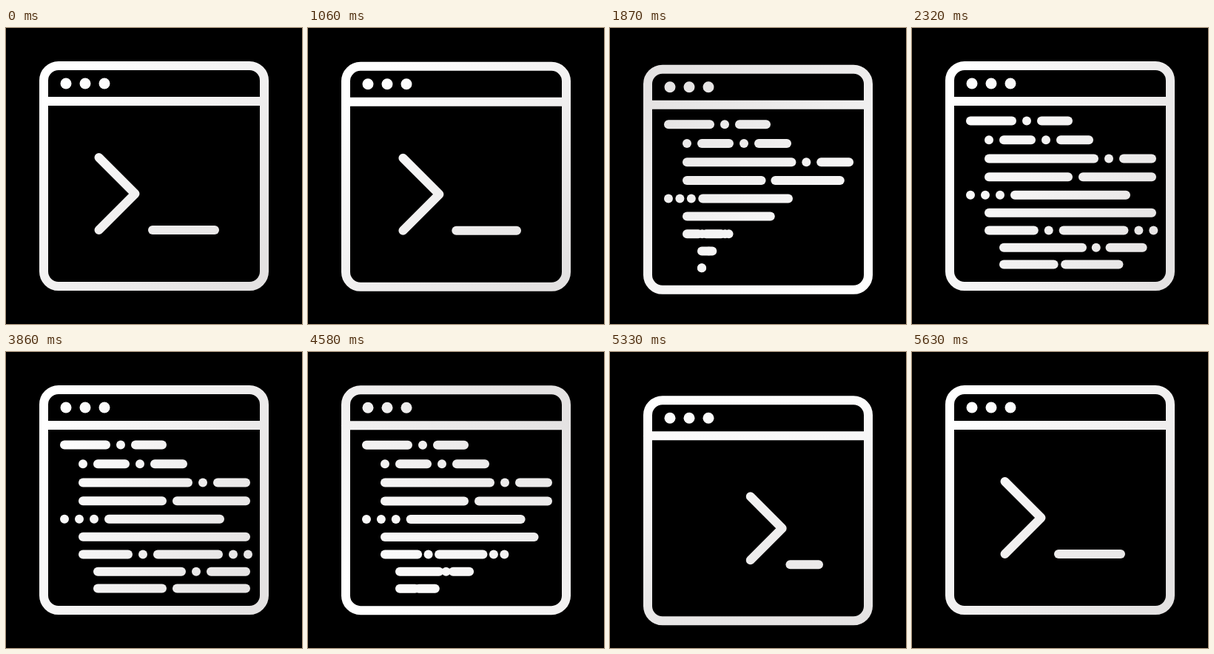
An HTML page with a canvas that plays this animation: 400x400 px, repeating every 5.66 s.

```html
<!DOCTYPE html>
<html>
<head>
<meta charset="utf-8">
<style>
html, body { margin: 0; width: 100%; height: 100%; overflow: hidden; background: #000; }
canvas { display: block; width: 400px; height: 400px; }
</style>
</head>
<body>
<canvas id="stage" width="400" height="400"></canvas>
<script>
const ctx = document.getElementById('stage').getContext('2d');
const LOOP = 5660, STEP = 30, STEPS = 60, GAP = 20;

// Code lines: indent, then bar lengths (0 is a dot), each GAP apart
const lines = [
  [79, 56, 0, 36],
  [104, 0, 37, 0, 38],
  [104, 142, 0, 38],
  [104, 107, 93],
  [79, 0, 0, 0, 150],
  [104, 220],
  [104, 61, 0, 82, 0, 0],
  [124, 113, 0, 47],
  [124, 87, 93]
];

const clamp = x => Math.min(1, Math.max(0, x));
const mix = (a, b, p) => a + (b - a) * p;
const smooth = x => (1 - Math.cos(Math.PI * clamp(x))) / 2;
const settle = x => 1 - (1 - clamp(x) ** 1.7) ** 4;

// Plays forward from 1000 ms, then the same steps backward until 5630 ms
function stepAt(t) {
  const forward = Math.floor((t - 1000) / STEP);
  const backward = Math.ceil((5630 - t) / STEP);
  return Math.max(0, Math.min(STEPS, forward, backward));
}

function paint(k) {
  const angle = (225 + 340 * clamp(k / 41) ** 1.6) * Math.PI / 180;
  const dx = 180 * Math.cos(angle), dy = 180 * Math.sin(angle);
  const g = ctx.createLinearGradient(200 + dx, 200 + dy, 200 - dx, 200 - dy);
  g.addColorStop(0, '#fff');
  g.addColorStop(1, '#e4e2e2');
  return g;
}

function path(...points) {
  ctx.beginPath();
  points.forEach(([x, y]) => ctx.lineTo(x, y));
  ctx.stroke();
}

function dot(x, y, r) {
  ctx.beginPath();
  ctx.arc(x, y, r, 0, 2 * Math.PI);
  ctx.fill();
}

function drawFrame() {
  ctx.beginPath();
  ctx.roundRect(51, 51, 298, 298, 20);
  ctx.stroke();
  path([51, 99], [349, 99]);
  for (const x of [81, 107, 133]) dot(x, 75, 7.5);
}

function drawPrompt(k) {
  const p = smooth(k / 19);
  if (p === 1) return;
  const arm = 49 * (1 - p ** 3.4), tip = mix(174.5, 282, p);
  path([tip - arm, 224 - arm], [tip, 224], [tip - arm, 224 + arm]);
  path([mix(198, 282, p), 273], [282, 273]);
}

// Each line stretches out from its indent; lower lines start later and take longer
function drawLines(k) {
  lines.forEach(([indent, ...lengths], i) => {
    const y = 125.5 + 24.25 * i + 0.2 * i * (8 - i);
    const start = 12 + 1.7 * i + 0.053 * i * i;
    if (k <= start) return;
    const p = settle((k - start) / (15 + 0.23 * i * i));
    let x = 0;
    for (const length of lengths) {
      const left = indent + x * p;
      if (length) path([left, y], [left + length * p, y]);
      else dot(left, y, 6);
      x += length + GAP;
    }
  });
}

function draw(now) {
  const k = stepAt(now % LOOP);
  const drop = 19 * smooth(k / 15) * (1 - smooth((k - 14) / 22.5));
  ctx.setTransform(1, 0, 0, 1, 0, 0);
  ctx.fillStyle = '#000';
  ctx.fillRect(0, 0, 400, 400);
  ctx.translate(0, drop);
  ctx.fillStyle = ctx.strokeStyle = paint(k);
  ctx.lineWidth = 12;
  ctx.lineCap = ctx.lineJoin = 'round';
  drawFrame();
  drawPrompt(k);
  drawLines(k);
}

const began = performance.now();
function tick() {
  draw(performance.now() - began);
  requestAnimationFrame(tick);
}
tick();
</script>
</body>
</html>
```
